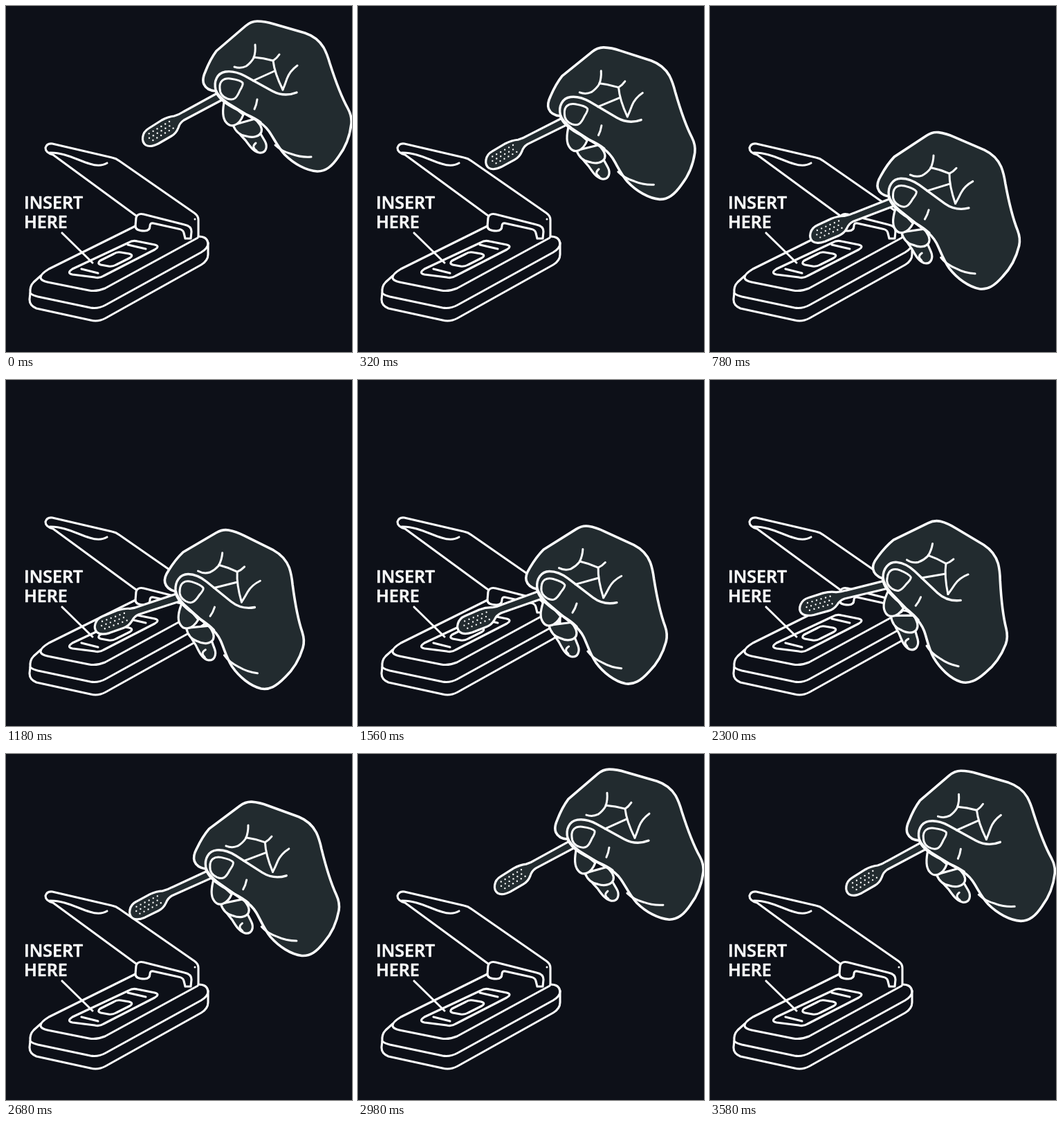
Recreate the animation shown at these times as an HTML page with a canvas. Size 500 by 500 pixels, loop 3600 ms.

```html
<!DOCTYPE html>
<html lang="en">
<head>
<meta charset="utf-8">
<title>Insert swab</title>
<style>
html, body { margin: 0; width: 100%; height: 100%; overflow: hidden; background: #0d1018; }
canvas { display: block; }
</style>
</head>
<body>
<canvas id="stage" width="500" height="500"></canvas>
<script>
const ctx = document.getElementById('stage').getContext('2d');
const INK = '#fbfcfc', BACK = '#0d1018', SKIN = '#222b2f';
const LOOP = 3600, CYCLE = 3500;
const PIVOT = { x: 361, y: 142 };

// Offset and tilt of the hand around PIVOT
const POSES = [
  { t: 0, x: 0, y: 0, deg: 0 },
  { t: 1000, x: -53, y: 177, deg: 8 },
  { t: 1333, x: -70, y: 204.5, deg: 12 },
  { t: 1667, x: -42, y: 183, deg: 7.7 },
  { t: 2000, x: -74, y: 219, deg: 18 },
  { t: 3000, x: 0, y: 0, deg: 0 },
  { t: CYCLE, x: 0, y: 0, deg: 0 }
];

const paths = list => list.map(d => new Path2D(d));

const DEVICE = paths([
  // lid
  'M188 303 L68 215 Q57 212 57 205 Q59 198 67 199 L153 219 Q159 220 164 224 L272 299 Q278 303 278 309 L278 333',
  'M63 212 C84 211 106 224 121 228 Q136 233 146 227',
  // hinge
  'M187 318 L188 306 Q190 299 199 301 L258 316 Q268 318 268 326 L267 336 L259 336 L257 328 Q256 323 249 322 L213 314 Q208 313 208 318 Q208 325 200 325 Q187 325 187 318 Z',
  // body
  'M187 318 L62 380 Q49 388 50 393 Q51 397 60 399 L120 411 Q131 413 143 408 L277 335',
  'M50 390 L40 399 Q34 405 35 415 Q38 418 46 420 L122 436 Q133 438 144 432 L282 356 Q292 350 292 343 Q291 333 278 333',
  'M35 415 L34 424 Q34 433 44 437 L122 454 Q133 457 144 451 L282 374 Q292 368 292 359 L292 342',
  // tray
  'M96 380 L177 342 Q183 338 190 340 L215 345 Q223 347 215 352 L141 390 Q135 394 128 392 L96 388 Q87 386 96 380 Z',
  'M136 368 L156 358 Q160 355 166 356 L178 358 Q185 360 179 364 L159 374 Q154 377 148 376 L137 374 Q131 372 136 368 Z',
  'M176 345 L202 351',
  'M109 380 L133 386',
  'M81 328 L125 371'
]);

const SWAB = paths([
  'M318 119 L256 153 Q250 157 243 159 Q234 160 225 165 L206 177 C196 183 195 196 202 201 C207 204 214 202 220 199 L239 188 Q246 184 249 176 Q251 169 257 165 L321 131 Z'
]);

const FINGERS = paths([
  'M328 170 C333 180 340 188 346 194 C352 202 357 210 366 212 C377 213 378 202 374 195 L364 178 Z',
  'M328 172 C332 182 338 187 347 188 C356 191 366 189 369 182 C371 175 366 170 360 163 Z',
  'M316 135 C313 148 312 161 318 168 C325 177 337 173 343 157 Z'
]);

const PALM = paths([
  'M303 123 Q290 122 286 113 Q283 106 288 95 Q295 77 304 65 L346 29 Q354 22 363 22 Q374 22 387 26 L432 39 Q450 45 459 60 Q464 69 468 83 C476 108 484 130 494 148 Q500 159 499 170 Q496 197 481 217 C471 232 462 239 450 239 C434 238 416 228 403 215 C392 203 387 191 380 181 Q373 171 360 164 L335 150 Q309 138 303 123 Z'
]);

const THUMB = new Path2D('M420 125 Q402 132 385 123 L345 101 Q330 93 317 95 C305 97 300 109 303 121 Q306 130 320 140 L346 156 Q360 162 368 168');

const CREASES = paths([
  'M360 56 Q361 66 358 75 Q354 82 347 87 Q339 91 330 88',
  'M358 74 Q372 75 386 79 Q391 76 395 70',
  'M386 79 Q388 97 400 121',
  'M421 86 Q410 94 406 105 Q403 114 400 121',
  'M388 94 L357 108',
  'M363 135 Q362 143 359 149',
  'M389 201 Q398 210 413 214 Q426 219 441 218',
  'M361 198 Q354 204 362 209',
  'M309 119 C308 109 314 104 324 105 Q339 107 342 111 Q343 114 338 122 C333 134 329 137 320 134 Q309 130 309 119 Z'
]);

// cubic-bezier(.42, 0, .58, 1), solved by bisection
function easeInOut(x) {
  let lo = 0, hi = 1;
  for (let i = 0; i < 24; i++) {
    const s = (lo + hi) / 2, r = 1 - s;
    if (1.26 * s * r * r + 1.74 * s * s * r + s ** 3 < x) lo = s; else hi = s;
  }
  return lo * lo * (3 - 2 * lo);
}

function poseAt(t) {
  const i = POSES.findIndex(p => p.t > t);
  const a = POSES[i - 1], b = POSES[i];
  const k = easeInOut((t - a.t) / (b.t - a.t));
  const mix = key => a[key] + (b[key] - a[key]) * k;
  return { x: mix('x'), y: mix('y'), deg: mix('deg') };
}

function stroke(list, width) {
  ctx.lineWidth = width;
  list.forEach(p => ctx.stroke(p));
}

function solid(list, width) {
  ctx.lineWidth = width;
  list.forEach(p => { ctx.fill(p); ctx.stroke(p); });
}

function label(text, y) {
  ctx.lineWidth = 0.7;
  ctx.fillText(text, 26, y);
  ctx.strokeText(text, 26, y);
}

function drawDevice() {
  stroke(DEVICE, 3.1);
  ctx.fillStyle = INK;
  ctx.beginPath();
  ctx.arc(273, 308, 1.5, 0, 7);
  ctx.fill();
  ctx.font = '600 25px "Open Sans", "Noto Sans", sans-serif';
  label('INSERT', 293);
  label('HERE', 321);
}

// Three staggered rows along the swab head
function drawDots() {
  ctx.fillStyle = INK;
  for (let row = -1; row <= 1; row++) {
    for (let i = 0; i < 6; i++) {
      const along = (i - 2.5) * 6.8 + (row ? 2 : -1), across = row * 5.6;
      ctx.beginPath();
      ctx.arc(222.5 + along * 0.86 + across * 0.5, 181.5 - along * 0.51 + across * 0.86, 1.2, 0, 7);
      ctx.fill();
    }
  }
}

function drawHand({ x, y, deg }) {
  ctx.save();
  ctx.translate(PIVOT.x + x, PIVOT.y + y);
  ctx.rotate(deg * Math.PI / 180);
  ctx.translate(-PIVOT.x, -PIVOT.y);
  ctx.fillStyle = SKIN;
  solid(SWAB, 3.2);
  drawDots();
  ctx.fillStyle = SKIN;
  solid(FINGERS, 3.2);
  solid(PALM, 3.6);
  stroke([THUMB], 3.4);
  stroke(CREASES, 3);
  ctx.restore();
}

function draw(now) {
  const t = now % LOOP % CYCLE;
  ctx.fillStyle = BACK;
  ctx.fillRect(0, 0, 500, 500);
  ctx.strokeStyle = INK;
  ctx.lineCap = ctx.lineJoin = 'round';
  drawDevice();
  drawHand(poseAt(t));
}

let start;
function tick(now) {
  start ??= now;
  draw(Math.max(0, now - start));
  requestAnimationFrame(tick);
}
draw(0);
requestAnimationFrame(tick);
</script>
</body>
</html>
```
